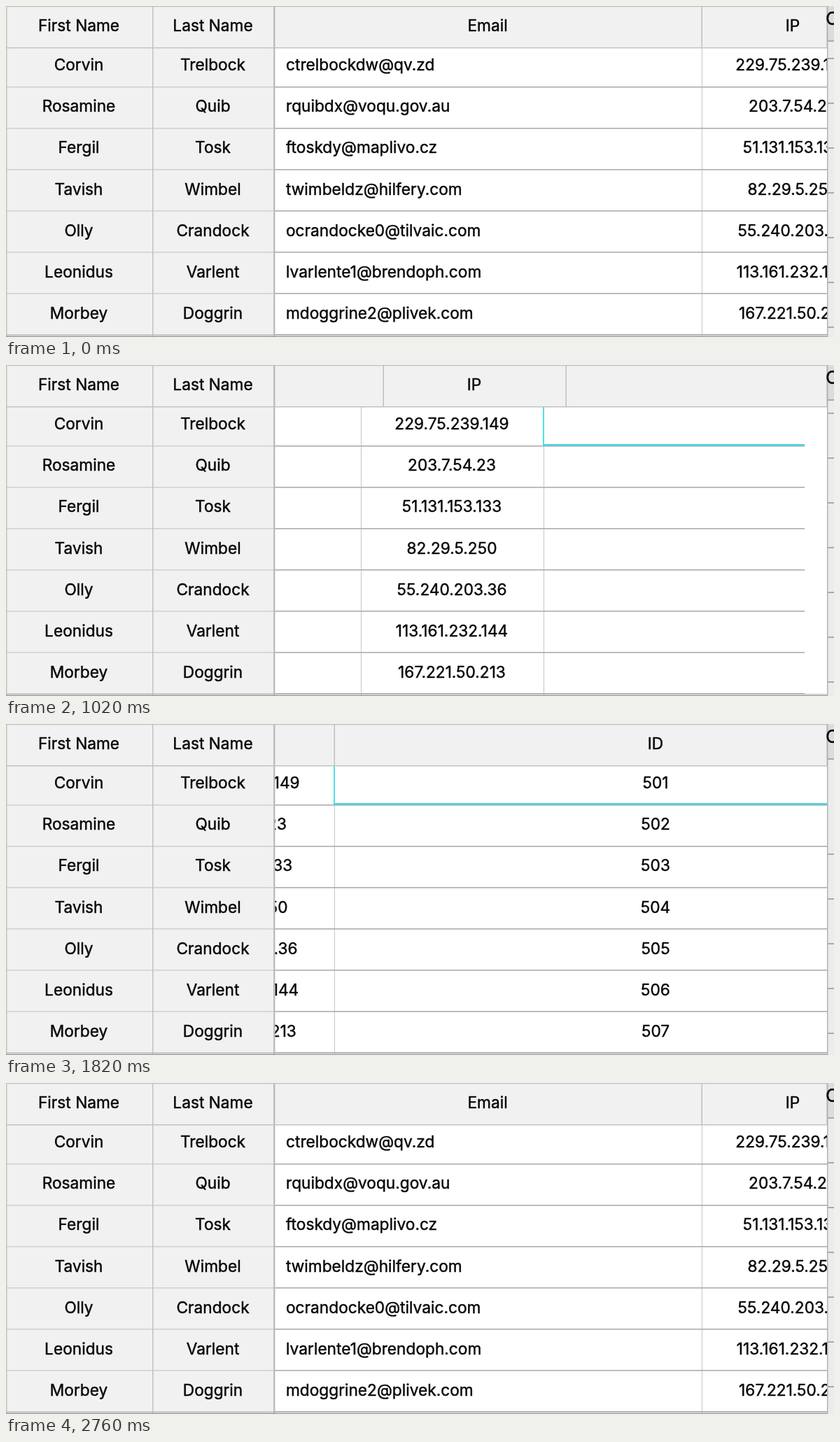
An HTML page with a canvas that plays this animation: 1183 px wide and 473 px high, repeating every 3100 ms.

```html
<!DOCTYPE html>
<html lang="en">
<head>
<meta charset="utf-8">
<title>Table with frozen columns</title>
<style>
  html, body { margin: 0; width: 100%; height: 100%; overflow: hidden; background: #fff; }
  canvas { display: block; width: 1183px; height: 473px; }
</style>
</head>
<body>
<canvas id="stage" width="1183" height="473"></canvas>
<script>
const ctx = document.getElementById('stage').getContext('2d');
const W = 1183, H = 473, LOOP = 3100;
const LEFT = 383, RIGHT = 1173, HEAD = 60;
const IP_X = 994, ID_X = 1255, IP_MID = 1124, ID_MID = 1714;
const FONT = 'Inter, "Open Sans", sans-serif';

const rows = [
  ['Corvin', 'Trelbock', 'ctrelbockdw@qv.zd', '229.75.239.149'],
  ['Rosamine', 'Quib', 'rquibdx@voqu.gov.au', '203.7.54.23'],
  ['Fergil', 'Tosk', 'ftoskdy@maplivo.cz', '51.131.153.133'],
  ['Tavish', 'Wimbel', 'twimbeldz@hilfery.com', '82.29.5.250'],
  ['Olly', 'Crandock', 'ocrandocke0@tilvaic.com', '55.240.203.36'],
  ['Leonidus', 'Varlent', 'lvarlente1@brendoph.com', '113.161.232.144'],
  ['Morbey', 'Doggrin', 'mdoggrine2@plivek.com', '167.221.50.213']
];

// [time, value, slope]
const scrollKeys = [
  [0, 0, 0.1], [780, 283, 0.88], [1020, 487, 0.8], [1400, 746, 0.38],
  [1640, 786, 0], [1840, 786, 0], [2180, 616, -0.95], [2480, 273, -1.15], [2760, 0, -0.5]
];
// How far the rows run ahead of the header and the painted area
const lagKeys = [
  [0, 0], [780, 36], [1020, 32], [1400, 10.5], [1640, 0],
  [1840, 0], [2180, -22], [2480, -36], [2760, 0]
];
// Page behind: scroll offset, negative when pulled past its top
const pageKeys = [
  [0, 39], [540, 45], [1080, 45], [1400, -3], [1660, -72],
  [1840, -72], [2180, -67.5], [2480, -36], [2700, 0]
];

function sample(keys, t) {
  const i = keys.findIndex(k => k[0] > t);
  if (i < 0) return keys[keys.length - 1][1];
  const [t0, a, va] = keys[i - 1], [t1, b, vb] = keys[i];
  const d = t1 - t0, u = (t - t0) / d;
  if (va === undefined) return a + (b - a) * u;
  const u2 = u * u, u3 = u2 * u;
  return a + (b - a) * (3 * u2 - 2 * u3) + d * (va * (u3 - 2 * u2 + u) + vb * (u3 - u2));
}

function box(x, y, w, h, color) {
  ctx.fillStyle = color;
  ctx.fillRect(x, y, w, h);
}

// A hairline stroke gives the slightly heavy look of smoothed type
function text(s, x, y, align = 'center', size = 22.7) {
  ctx.font = size + 'px ' + FONT;
  ctx.textAlign = align;
  ctx.fillStyle = ctx.strokeStyle = '#080808';
  ctx.lineWidth = 0.45;
  ctx.lineJoin = 'round';
  ctx.fillText(s, x, y);
  ctx.strokeText(s, x, y);
}

function clipped(x, y, w, h, paint) {
  ctx.save();
  ctx.beginPath();
  ctx.rect(x, y, w, h);
  ctx.clip();
  paint();
  ctx.restore();
}

const rowLine = i => Math.round(114.7 + i * 59.1);
const baseline = i => 92 + i * 59.17;

function drawPage(offset) {
  box(RIGHT, 0, W - RIGHT, H, '#ececec');
  box(RIGHT, 0, W - RIGHT, 50, '#dcdcdc');
  box(RIGHT, 49, W - RIGHT, 2, '#a9a9a9');
  for (let n = 1; n < 9; n++) {
    const y = Math.round(50 + n * 64 - offset);
    if (y > 52) box(RIGHT, y - 1, W - RIGHT, 2, '#ababab');
  }
}

function drawBody(scroll, lag) {
  box(LEFT, HEAD, RIGHT - LEFT, H - HEAD, '#fff');
  const from = Math.max(LEFT, LEFT - lag), to = Math.min(RIGHT, RIGHT - lag);
  clipped(from, HEAD, to - from, H - HEAD, () => {
    box(IP_X - scroll, HEAD, 1, H, '#c6c6c6');
    box(ID_X - scroll, HEAD, 1, H, '#c6c6c6');
    rows.forEach((r, i) => {
      box(LEFT, rowLine(i), RIGHT - LEFT, 1.6, '#adadad');
      text(r[2], 400 - scroll, baseline(i), 'left');
      text(r[3], IP_MID - scroll, baseline(i));
      text(String(501 + i), ID_MID - scroll, baseline(i));
    });
    box(ID_X - 1 - scroll, HEAD, 2, 55, '#4fdfe6');
    box(ID_X - 1 - scroll, 113, 930, 2.5, '#45d6de');
  });
}

function drawHeader(scroll) {
  box(LEFT, 0, RIGHT - LEFT, HEAD, '#f1f1f1');
  clipped(LEFT, 0, RIGHT - LEFT, HEAD, () => {
    box(IP_X - 0.5 - scroll, 0, 1.5, HEAD, '#bfbfbf');
    box(ID_X - 0.5 - scroll, 0, 1.5, HEAD, '#bfbfbf');
    text('Email', 688 - scroll, 36);
    text('IP', IP_MID - scroll, 36);
    text('ID', ID_MID - scroll, 36);
  });
}

function drawFrozen() {
  box(0, 0, LEFT, H, '#f1f1f1');
  rows.forEach((r, i) => {
    box(0, rowLine(i), LEFT, 1.6, '#d2d2d2');
    text(r[0], 104, baseline(i));
    text(r[1], 295.5, baseline(i));
  });
  text('First Name', 104, 36);
  text('Last Name', 295.5, 36);
  box(0, 0, 1.5, H, '#c2c2c2');
  box(209, 0, 1.5, H, '#c2c2c2');
  box(382, 0, 2.5, H, '#bdbdbd');
}

function draw(t) {
  const scroll = Math.round(sample(scrollKeys, t));
  const lag = Math.round(sample(lagKeys, t));
  drawPage(sample(pageKeys, t));
  drawBody(scroll, lag);
  drawHeader(Math.max(0, scroll - lag));
  drawFrozen();
  box(0, 0, RIGHT, 1.2, '#bdbdbd');
  box(0, 59, RIGHT, 1.5, '#c2c2c2');
  box(0, 470, RIGHT, 1.2, '#b4b4b4');
  box(0, 472, RIGHT, 1, '#8c8c8c');
  box(RIGHT - 1, 0, 1, HEAD, '#d0d0d0');
  box(RIGHT, 0, 1.5, H, '#b2b2b2');
  clipped(RIGHT - 1, 0, W - RIGHT + 1, 50, () => text('C', 1171, 27, 'left', 26));
}

const start = performance.now();
function frame() {
  const t = (performance.now() - start) % LOOP;
  draw(Math.floor(t / 20) * 20);
  requestAnimationFrame(frame);
}
frame();
</script>
</body>
</html>
```
